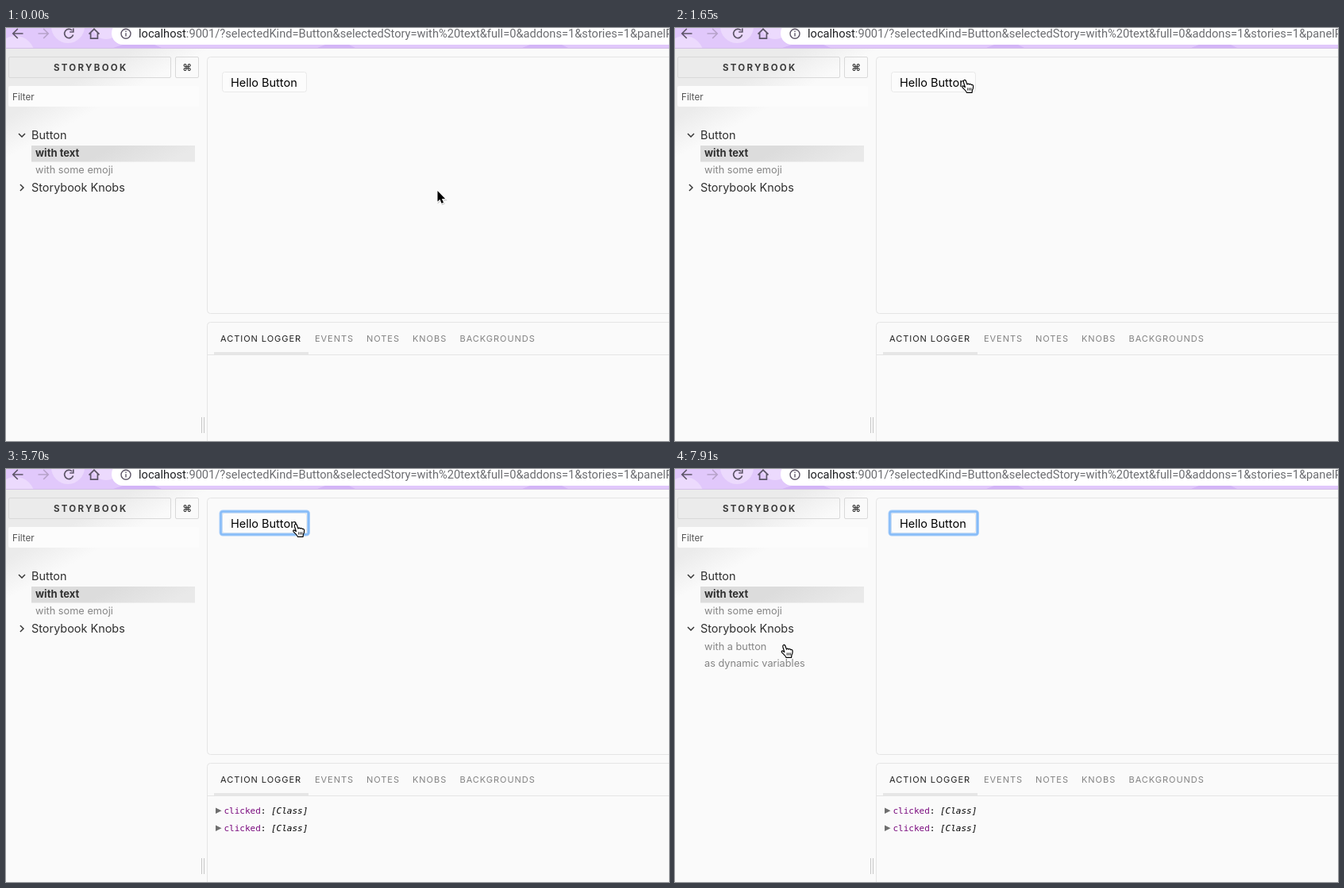
Recreate the animation shown at these times as an HTML page. Size 835 by 520 pixels, loop 8000 ms.

```html
<!DOCTYPE html>
<html lang="en">
<head>
<meta charset="utf-8">
<title>Storybook</title>
<style>
  html, body { margin: 0; width: 100%; height: 100%; overflow: hidden; background: #fafafa; }
  svg { display: block; width: 835px; height: 520px; }
  text { font-family: Inter, "Open Sans", sans-serif; white-space: pre; }
  .url { font: 14.65px Roboto, sans-serif; fill: #6c6d71; }
  .kind { font-size: 14.45px; fill: #2f2f2f; }
  .story { font-size: 12.75px; fill: #858585; }
  .story.on { font-size: 13.05px; font-weight: 700; fill: #303030; }
  .tab { font-size: 11px; letter-spacing: .96px; fill: #828282; }
  .tab.on { fill: #222; }
  .log { font: 11px "DejaVu Sans Mono", monospace; fill: #000; }
  .line { fill: none; stroke: #e5e5e5; }
  .icon { fill: none; stroke: #5e5668; stroke-width: 1.7; }
  .chevron { fill: none; stroke: #333; stroke-width: 1.4; }
</style>
</head>
<body>
<svg viewBox="0 0 835 520">
  <defs>
    <linearGradient id="shade" gradientUnits="userSpaceOnUse" x1="47.5" y1="88" x2="68.9" y2="127.6">
      <stop stop-color="#ebebeb"/><stop offset="1" stop-color="#fafafa"/>
    </linearGradient>
    <linearGradient id="row" gradientUnits="userSpaceOnUse" x1="92.6" y1="171.6" x2="116" y2="216">
      <stop stop-color="#dcdcdc"/><stop offset="1" stop-color="#e9e9e9"/>
    </linearGradient>
    <clipPath id="bar"><rect width="835" height="25"/></clipPath>
    <clipPath id="fold"><rect id="foldBox" y="212" width="250" height="0"/></clipPath>
    <path id="chev" d="M-2.1-4 2 0-2.1 4"/>
  </defs>

  <!-- browser bar -->
  <g clip-path="url(#bar)">
    <rect width="835" height="25" fill="#e1c8fb"/>
    <g fill="#ecdafd">
      <circle cx="12" cy="34" r="24"/>
      <circle cx="78" cy="-2" r="21"/>
      <circle cx="126" cy="-4" r="18"/>
    </g>
    <path d="M135 25l12-4h40l9 4zM392 25l10-4h30l8 4zM650 25l10-4h40l8 4z" fill="#d3b5f7"/>
    <rect x="133" y="-8" width="760" height="29" rx="14.5" fill="#fff"/>
  </g>
  <rect y="25" width="835" height="1" fill="#d3bfe6"/>
  <g class="icon">
    <path d="M21.5 7H9.5M14.8 1 8.8 7l6 6"/>
    <path d="M40.5 7h12M47.2 1l6 6-6 6" stroke="#b7a2ca"/>
    <path d="M83.2 3A5.6 5.6 0 1 0 84.6 8.6M84.8.5V5h-4.6"/>
    <path d="M104.5 7.6 111 1.3l6.5 6.3M106.6 6v7.2h8.8V6"/>
    <circle cx="151" cy="7.2" r="6" stroke-width="1.4"/>
    <path d="M151 6.3v4.3M151 3.6v1.5" stroke-width="1.4"/>
  </g>
  <text class="url" x="167" y="12.3"><tspan fill="#202124">localhost</tspan>:9001/?selectedKind=Button&amp;selectedStory=with%20text&amp;full=0&amp;addons=1&amp;stories=1&amp;panelRight=0</text>

  <!-- sidebar -->
  <rect y="26" width="253" height="150" fill="url(#shade)"/>
  <g fill="none" stroke="#d9d9d9">
    <rect x="3.5" y="36.5" width="204" height="26" rx="1.5"/>
    <rect x="213.5" y="36.5" width="29" height="26" rx="1.5"/>
  </g>
  <text x="60" y="54" font-size="11.5" font-weight="700" letter-spacing="2.3" fill="#3c3c3c">STORYBOOK</text>
  <text x="228" y="54.2" font-size="12" font-weight="600" text-anchor="middle" fill="#333">⌘</text>
  <rect x="3" y="73" width="240" height="26" rx="2" fill="#fcfcfc"/>
  <text x="8" y="91" font-size="11.7" fill="#555">Filter</text>
  <use href="#chev" class="chevron" transform="translate(20 135) rotate(90)"/>
  <text class="kind" x="32" y="140">Button</text>
  <rect x="32" y="148" width="206" height="20.5" fill="url(#row)"/>
  <text class="story on" x="37" y="162">with text</text>
  <text class="story" x="37" y="183">with some emoji</text>
  <use href="#chev" class="chevron" id="knobs"/>
  <text class="kind" x="32" y="206">Storybook Knobs</text>
  <g clip-path="url(#fold)">
    <text class="story" x="37" y="228">with a button</text>
    <text class="story" x="37" y="249">as dynamic variables</text>
  </g>
  <path d="M246.5 490v20M249.5 490v20" stroke="#c6c6c6"/>

  <!-- preview -->
  <rect class="line" x="253.5" y="36.5" width="600" height="323" rx="4"/>
  <rect x="272.5" y="55.5" width="106" height="25" rx="3" fill="#fcfcfc" stroke="#e9e9e9"/>
  <g id="focus" fill="none">
    <rect x="270.5" y="53.5" width="110.5" height="29" rx="2.5" stroke="#a9cffb" stroke-width="4"/>
    <rect x="270.5" y="53.5" width="110.5" height="29" rx="2.5" stroke="#86bbf7" stroke-width="2"/>
  </g>
  <text x="283" y="74" font-size="14.5" fill="#000">Hello Button</text>

  <!-- addons -->
  <rect class="line" x="253.5" y="370.5" width="600" height="200" rx="4"/>
  <path class="line" d="M254 411.5h600"/>
  <rect x="262" y="408" width="119" height="3" fill="#e6e6e6"/>
  <g id="tabs"></g>
  <g id="logs"></g>

  <!-- pointers -->
  <g id="arrow">
    <path d="M.8 1.6V15l3-2.7 2 4.9 2.6-1.1-2-4.6h4.2z" fill="#000" opacity=".18" stroke="#000" stroke-width="1.4"/>
    <path d="M0 0V13.6L3 10.8l2.1 4.9 2.4-1-2.1-4.8h4.2z" fill="#000" stroke="#fff" stroke-width="1.6" paint-order="stroke"/>
  </g>
  <g id="hand" stroke="#000" stroke-width="1.2" stroke-linejoin="round">
    <path fill="#fff" d="M5.4 10.6 3.4 4.2C2.6 1.4 5.5.4 6.4 2.8L8 7.1C8.7 5.6 10.3 5.9 10.6 7.1 11.4 6 12.8 6.5 13.1 7.7 14 6.9 15.4 7.5 15.6 9 15.8 11.2 15.4 12.8 14.4 14.4L14.1 17.3H7.4C6.8 15.1 4.3 13.3 2.2 11.2 .8 9.5 2.5 8.4 3.8 9.4z"/>
    <path fill="none" stroke-width=".9" d="M8.7 11.4v3.2M10.8 11.4v3.2M12.8 11.4v3.2"/>
  </g>
  <g id="resize" fill="#000" stroke="#fff" stroke-width="1.6" paint-order="stroke">
    <path d="M-2.2-6.8h1.4V-.8H.8v-6h1.4V-.8H4.6V-3.6L8.2 0 4.6 3.6V.8H2.2v6H.8v-6H-.8v6h-1.4v-6h-2.4v2.8L-8.2 0l3.6-3.6v2.8h2.4z"/>
  </g>
</svg>
<script>
const LOOP = 8000;
const $ = id => document.getElementById(id);

// time, pointer, x, y
const POINTER = [
  [0, "arrow", 543.5, 205], [150, "arrow", 539, 205.5], [300, "arrow", 537, 205.5],
  [450, "arrow", 536, 205.5], [1050, "arrow", 513, 192], [1200, "arrow", 427, 138],
  [1350, "arrow", 382, 99], [1500, "hand", 364, 68], [1650, "hand", 360, 64],
  [5700, "hand", 360, 68], [5840, "hand", 346, 81], [5990, "arrow", 325, 97],
  [6140, "resize", 245, 137.5], [6280, "hand", 162, 186], [6430, "hand", 140, 209],
  [6570, "hand", 139.5, 209], [7620, "hand", 136, 214], [7770, "hand", 133, 218],
  [7910, "hand", 132.5, 220]
];
const TURN = [[0, 0], [7020, 8], [7170, 62], [7320, 90]];
const FOLD = [[0, 0], [7170, 33], [7320, 45]];
const CLICKS = [2400, 4350];
const TABS = [["ACTION LOGGER", 270], ["EVENTS", 389], ["NOTES", 454], ["KNOBS", 512], ["BACKGROUNDS", 571.5]];

$("tabs").innerHTML = TABS.map(([name, x], i) =>
  `<text class="tab${i ? "" : " on"}" x="${x}" y="395">${name}</text>`).join("");

$("logs").innerHTML = CLICKS.map((_, i) =>
  `<g transform="translate(0 ${i * 22})"><path d="M264 426.5l7.5 3.8-7.5 3.8z" fill="#6e6e6e"/>` +
  `<text class="log" x="274.4" y="434"><tspan fill="#7a0a7e">clicked</tspan>: ` +
  `<tspan font-style="italic">[Class]</tspan></text></g>`).join("");

const at = (steps, t) => steps.findLast(step => step[0] <= t);

function draw(t) {
  const [, kind, x, y] = at(POINTER, t);
  for (const id of ["arrow", "hand", "resize"]) {
    $(id).style.display = id === kind ? "" : "none";
  }
  $(kind).setAttribute("transform", `translate(${x} ${y})`);
  $("knobs").setAttribute("transform", `translate(20 201) rotate(${at(TURN, t)[1]})`);
  $("foldBox").setAttribute("height", at(FOLD, t)[1]);
  $("focus").style.display = t >= CLICKS[0] ? "" : "none";
  CLICKS.forEach((time, i) => {
    $("logs").children[i].style.display = t >= time ? "" : "none";
  });
}

const start = performance.now();
function tick() {
  draw((performance.now() - start) % LOOP);
  requestAnimationFrame(tick);
}
tick();
</script>
</body>
</html>
```
